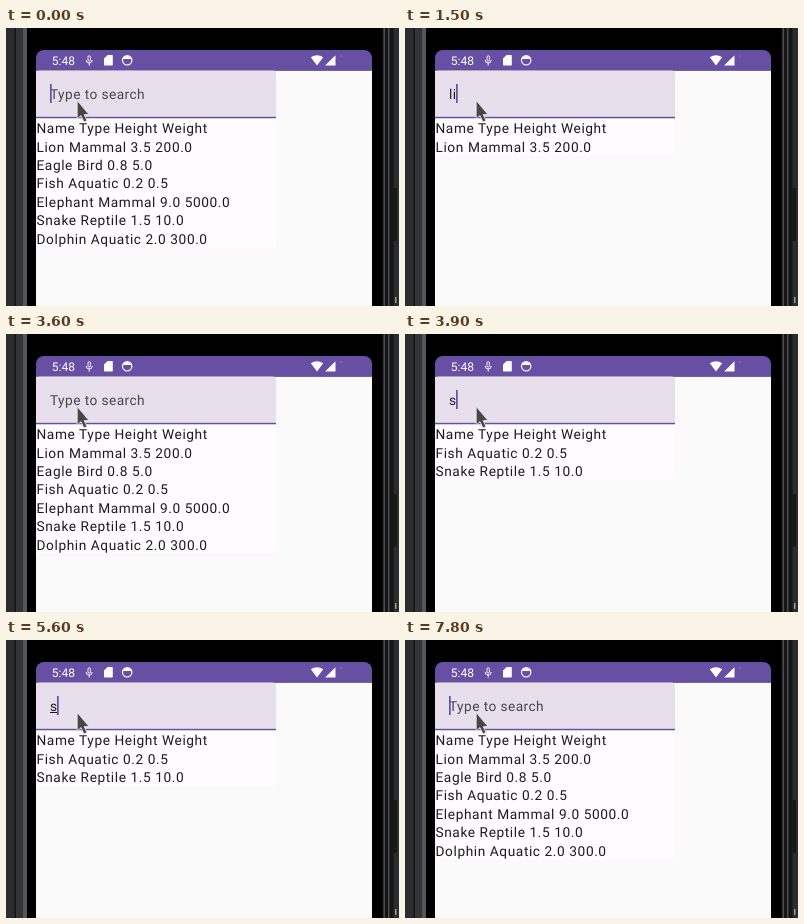
An HTML page that plays this animation: 393 by 278 pixels, repeating every 8000 ms.

```html
<!DOCTYPE html>
<html lang="en">
<head>
<meta charset="utf-8">
<title>Search list</title>
<style>
  html, body { margin: 0; width: 100%; height: 100%; overflow: hidden; background: #000; }
  svg { display: block; width: 393px; height: 278px; }
  text { font: 13.71px Roboto, sans-serif; letter-spacing: .42px; fill: #1c1b1f; text-rendering: geometricPrecision; }
  #rows text { letter-spacing: .58px; }
  #hint { fill: #49454f; }
  #clock { font-size: 12px; letter-spacing: 0; fill: #fff; }
</style>
</head>
<body>
<svg viewBox="0 0 393 278">
  <!-- phone body -->
  <rect width="393" height="278" fill="#2b2c2f"/>
  <rect x="8.5" width="379" height="278" fill="#151516"/>
  <rect x="10" width="7" height="278" fill="#333437"/>
  <rect x="17" width="4" height="278" fill="#55565a"/>
  <rect x="21" width="355.5" height="278" fill="#000"/>
  <rect x="377.5" width="1.5" height="278" fill="#4a4b4e"/>
  <rect x="382" width="1.5" height="278" fill="#4a4b4e"/>
  <rect x="387.5" y="160" width="3.5" height="53" rx="1" fill="#17181a"/>
  <rect x="389" y="269" width="1.5" height="6" fill="#999"/>

  <!-- screen and status bar -->
  <path d="M30 278V42.5H366V278z" fill="#fafafa"/>
  <path d="M30 42.5V30a8 8 0 0 1 8-8H358a8 8 0 0 1 8 8V42.5z" fill="#6750a4"/>
  <text id="clock" x="45.8" y="37">5:48</text>
  <g fill="#fff">
    <rect x="82" y="27.7" width="2.4" height="5.4" rx="1.2" fill="none" stroke="#fff" stroke-width=".9"/>
    <path d="M80.2 32a3 3 0 0 0 6 0M83.2 35v2.6" fill="none" stroke="#fff"/>
    <path d="M101.6 27h4.4q.8 0 .8.8v8.9q0 .8-.8.8h-7.2q-.8 0-.8-.8V30.6z"/>
    <circle cx="121.2" cy="32.3" r="4.7" fill="none" stroke="#fff" stroke-width="1.2"/>
    <path d="M117 31a4.5 4.5 0 0 1 8.4 0z"/>
    <path d="M304.8 29.3q6.2-4.2 12.4 0l-6.2 8.2z"/>
    <path d="M329.5 27.3v10.2h-10.4z"/>
    <rect x="334.5" y="27.5" width="1" height="1" opacity=".5"/>
  </g>

  <!-- search field -->
  <path d="M30 90.5V45.9a3.4 3.4 0 0 1 3.4-3.4H266.6a3.4 3.4 0 0 1 3.4 3.4V90.5z" fill="#e7e0ec"/>
  <rect x="30" y="88.8" width="240" height="1.7" fill="#6750a4"/>
  <text id="hint" x="44" y="71">Type to search</text>
  <text id="query" x="44" y="71"></text>
  <rect id="underline" x="44" y="72" height="1" fill="#1c1b1f"/>
  <rect id="caret" y="56" width="1.7" height="19" fill="#6750a4"/>

  <!-- results -->
  <rect id="panel" x="30" y="90.5" width="240" fill="#fffbfe"/>
  <g id="rows"></g>

  <path d="M71.2 72.5V91L75 87.6 77.9 94 81 92.6 78.2 86.6H83z" fill="#474747" stroke="#eee" stroke-width=".8"/>
</svg>
<script>
const LOOP = 8000, ROW_HEIGHT = 18.43;
const HEADER = "Name Type Height Weight";
const ANIMALS = [
  "Lion Mammal 3.5 200.0",
  "Eagle Bird 0.8 5.0",
  "Fish Aquatic 0.2 0.5",
  "Elephant Mammal 9.0 5000.0",
  "Snake Reptile 1.5 10.0",
  "Dolphin Aquatic 2.0 300.0",
];

// [start ms, query, caret visible, underlined]
const STATES = [
  [0, "", 1, 0], [200, "", 0, 0], [600, "", 1, 0], [1200, "", 0, 0],
  [1300, "l", 1, 0], [1400, "l", 1, 1], [1500, "li", 1, 0],
  [1800, "lio", 1, 0], [2000, "lio", 1, 1], [2300, "lio", 0, 1],
  [2500, "li", 1, 0], [2600, "li", 1, 1], [2800, "l", 1, 1],
  [3000, "", 1, 0], [3600, "", 0, 0],
  [3900, "s", 1, 0], [4100, "sn", 1, 0], [4300, "snak", 1, 0],
  [4400, "snake", 1, 0], [4700, "snake", 1, 1],
  [4900, "snak", 1, 1], [5100, "sna", 1, 1],
  [5300, "sn", 1, 0], [5400, "sn", 1, 1], [5500, "s", 1, 0], [5600, "s", 1, 1],
  [5700, "", 1, 0], [6300, "", 0, 0], [6800, "", 1, 0], [7300, "", 0, 0], [7800, "", 1, 0],
];

const el = id => document.getElementById(id);
const show = (id, visible) => el(id).setAttribute("visibility", visible ? "visible" : "hidden");

function render([, query, caret, underlined]) {
  el("query").textContent = query;
  const width = query ? Math.floor(el("query").getComputedTextLength()) : 0;
  el("underline").setAttribute("width", width);
  el("caret").setAttribute("x", 44 + width);
  show("hint", !query);
  show("underline", underlined);
  show("caret", caret);

  const lines = [HEADER, ...ANIMALS.filter(a => a.toLowerCase().includes(query))];
  el("panel").setAttribute("height", lines.length * ROW_HEIGHT);
  el("rows").innerHTML = lines
    .map((line, i) => `<text x="30.5" y="${105.15 + i * ROW_HEIGHT}">${line}</text>`)
    .join("");
}

const start = performance.now();
let current;
function tick() {
  const time = (performance.now() - start) % LOOP;
  const state = STATES.findLast(s => s[0] <= time) || STATES[0];
  if (state !== current) render(current = state);
  requestAnimationFrame(tick);
}
tick();
</script>
</body>
</html>
```
